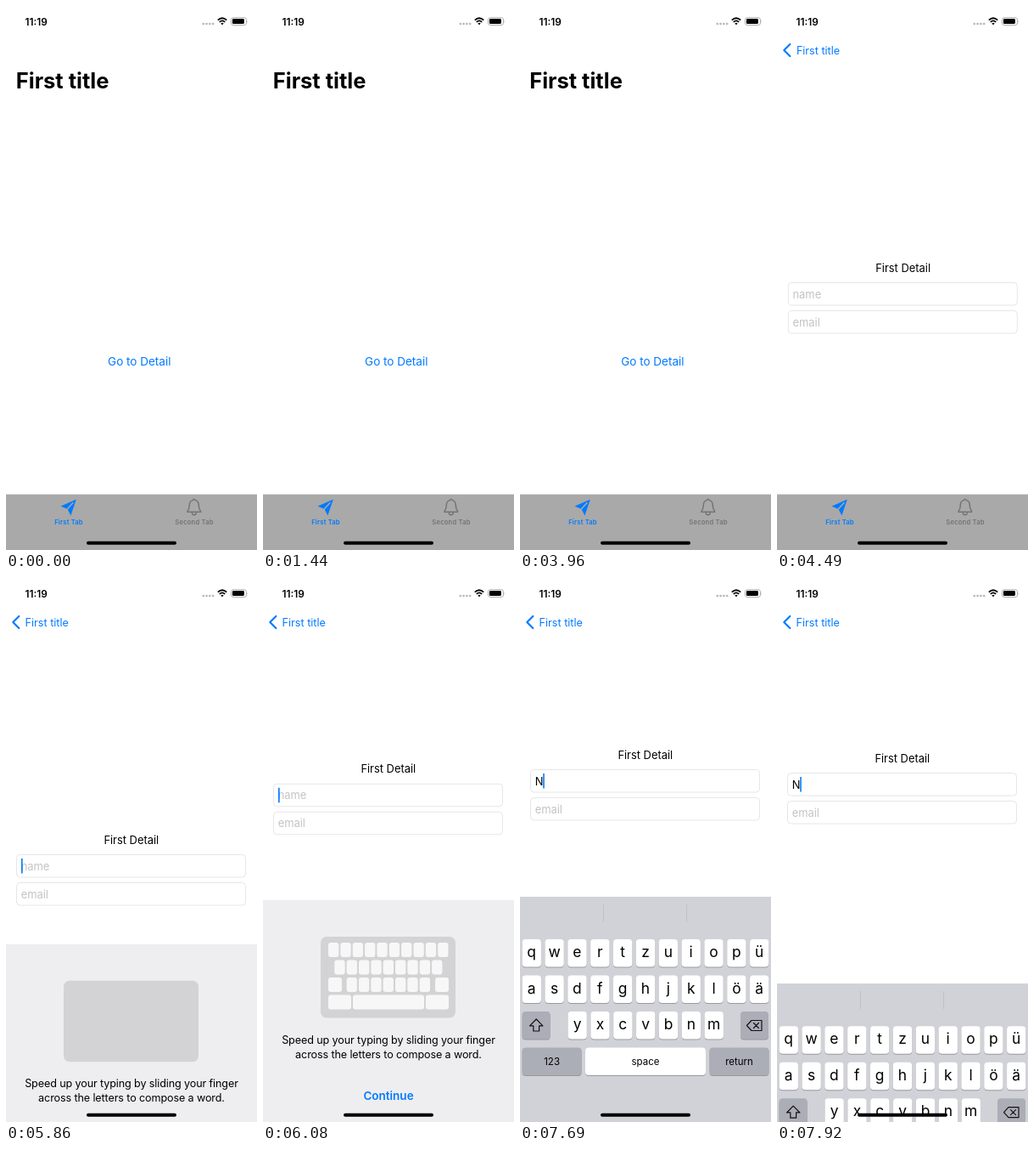
An HTML page for the animation above (7990 ms loop, 296 by 640 pixels).

```html
<!DOCTYPE html>
<html lang="en">
<head>
<meta charset="utf-8">
<title>Tabs, detail page and keyboard</title>
<style>
  html, body { margin: 0; width: 100%; height: 100%; overflow: hidden; background: #fff; }
  svg { display: block; width: 100%; height: 100%; font-family: Inter, Roboto, sans-serif; font-size: 12.9px; }
  .mid { text-anchor: middle; }
  .semi { font-weight: 600; }
  .blue { fill: #007aff; }
  .hint { fill: #c3c3c6; }
  .large { font-size: 25.5px; font-weight: 700; }
  .field { fill: #fff; stroke: #e6e6e6; }
  .tip { font-size: 12.6px; letter-spacing: -.12px; }
  .tab { font-size: 7.6px; font-weight: 600; letter-spacing: .2px; stroke: none; }
  .icon { stroke-width: 1.5; stroke-linejoin: round; stroke-linecap: round; }
  .key { font-size: 17.4px; text-anchor: middle; }
  .small { font-size: 11.5px; text-anchor: middle; }
  .line { fill: none; stroke: #111; stroke-width: 1.2; stroke-linejoin: round; stroke-linecap: round; }
</style>
</head>
<body>
<svg viewBox="0 0 296 640" xmlns="http://www.w3.org/2000/svg">
  <defs>
    <linearGradient id="sky" x2="1" y2=".4">
      <stop offset="0" stop-color="#aebfd6"/><stop offset=".3" stop-color="#dde5ee"/>
      <stop offset=".7" stop-color="#e4ebf3"/><stop offset="1" stop-color="#bdd2ec"/>
    </linearGradient>
    <linearGradient id="trees" x2="0" y2="1">
      <stop offset="0" stop-color="#85807f"/><stop offset=".5" stop-color="#9a8a80"/><stop offset="1" stop-color="#846c5e"/>
    </linearGradient>
    <linearGradient id="wool" x2="0" y2="1">
      <stop offset="0" stop-color="#dfd2c5"/><stop offset=".6" stop-color="#d3c1b1"/><stop offset="1" stop-color="#bfa590"/>
    </linearGradient>
    <linearGradient id="face" x2="0" y2="1">
      <stop offset="0" stop-color="#74655d"/><stop offset="1" stop-color="#5c4b43"/>
    </linearGradient>
    <filter id="blur" x="-20%" y="-20%" width="140%" height="140%"><feGaussianBlur stdDeviation="5"/></filter>
    <filter id="soft"><feGaussianBlur stdDeviation="1.7"/></filter>
    <clipPath id="frame"><rect y="293.500" width="296" height="197"/></clipPath>
  </defs>
  <rect width="296" height="640" fill="#fff"/>

  <g id="home">
    <text id="go" class="blue mid" x="157.300" y="422.700" font-size="13.5">Go to Detail</text>
  </g>
  <text id="title" class="large" x="11.800" y="97.400">First title</text>

  <g id="second">
    <text class="mid semi" x="147.700" y="56.600">Second</text>
    <g clip-path="url(#frame)">
      <rect y="293" width="296" height="198" fill="url(#sky)"/>
      <g filter="url(#blur)">
        <path d="M-15 306L22 302 40 328 62 346 100 350 110 510H-15Z" fill="url(#trees)"/>
        <path d="M185 376L215 374 238 356 248 376 268 364 280 392 312 402V510H185Z" fill="url(#trees)"/>
        <path d="M-10 312H32L38 345 20 370-10 360Z" fill="#716c6c"/>
        <path d="M232 362L242 355 250 390 264 365 278 398 255 415 232 400Z" fill="#7a706c"/>
        <ellipse cx="262" cy="480" rx="38" ry="18" fill="#6f584c"/>
      </g>
      <g filter="url(#soft)">
        <path d="M98 372Q90 412 82 440L75 496H201L200 440 190 370Z" fill="url(#wool)"/>
        <path d="M81 442L75 496H90Q84 465 90 425Z" fill="#a9836a"/>
        <path d="M112 440Q138 458 164 440L160 496H118Z" fill="#c0a995"/>
        <path d="M85 292Q90 318 101 330L122 321Q119 302 114 292ZM217 292Q210 322 196 338L176 325Q179 305 187 292Z" fill="#544741"/>
        <path d="M95 292Q99 312 107 321L116 315 109 292ZM208 292Q204 315 194 326L185 320Q187 306 195 292Z" fill="#93796c"/>
        <path d="M103 330Q119 314 146 312 176 314 192 333 199 350 192 374 187 405 169 424 148 438 122 430 104 414 98 380 92 350 103 330Z" fill="url(#face)"/>
        <path d="M121 328Q147 310 174 328L160 354Q141 342 126 357Z" fill="#85776f"/>
        <path d="M135 338Q146 329 156 339L154 352H133Z" fill="#a7a6aa"/>
        <ellipse cx="141" cy="386" rx="25" ry="30" fill="#97877c"/>
        <path d="M121 429Q138 425 153 430L145 443 131 441Z" fill="#43352f"/>
        <path d="M122 362Q129 353 142 353 156 353 161 363 154 374 144 374L141 380 138 374Q127 374 122 362Z" fill="#544742"/>
        <path d="M117 395Q129 405 141 398 152 405 165 396 163 414 142 417 122 415 117 395Z" fill="#6d5a50"/>
        <path d="M122 404Q132 409 142 405 152 409 161 404 154 414 142 414 130 414 122 404Z" fill="#b5a193"/>
        <circle cx="100" cy="352" r="6.500" fill="#1f1a1b"/><circle cx="188" cy="355" r="6.500" fill="#1f1a1b"/>
        <path d="M98 400L118 392M165 394L187 400" stroke="#e8ddd2" stroke-width="1.500"/>
      </g>
    </g>
  </g>

  <g id="detail">
    <rect y="92" width="296" height="620" fill="#fff"/>
    <text class="mid" x="147.800" y="312.600">First Detail</text>
    <rect class="field" x="12.500" y="325.500" width="270" height="26.500" rx="4"/>
    <rect class="field" x="12.500" y="358.500" width="270" height="26.500" rx="4"/>
    <text id="name" class="hint" x="17.700" y="343.600">name</text>
    <text class="hint" x="17.700" y="376.600">email</text>
    <rect id="caret" class="blue" y="330" width="1.600" height="17.500"/>
  </g>
  <g id="back">
    <path d="M15.300 45L8.300 52 15.300 59" fill="none" stroke="#007aff" stroke-width="2.200" stroke-linecap="round" stroke-linejoin="round"/>
    <text id="backText" class="blue" y="56.600" font-size="12.6">First title</text>
  </g>

  <text class="semi" x="22.600" y="22.700" font-size="11.8">11:19</text>
  <g fill="#b9b9b9">
    <rect x="231.500" y="19.700" width="2.500" height="2.500" rx=".8"/><rect x="235.300" y="19.700" width="2.500" height="2.500" rx=".8"/>
    <rect x="239.100" y="19.700" width="2.500" height="2.500" rx=".8"/><rect x="242.900" y="19.700" width="2.500" height="2.500" rx=".8"/>
  </g>
  <path d="M249.800 16.600Q255 11.800 260.200 16.600M251.800 18.800Q255 15.900 258.200 18.800" fill="none" stroke="#000" stroke-width="1.800"/>
  <path d="M253.300 20.500Q255 19.200 256.700 20.500L255 22.300Z"/>
  <rect x="265.500" y="13.700" width="18" height="8.800" rx="2.600" fill="none" stroke="#a5a5a5" stroke-width=".9"/>
  <rect x="266.900" y="15.100" width="14" height="6" rx="1.400"/>
  <path d="M284.600 16.700Q286 18.100 284.600 19.500Z" fill="#a5a5a5"/>

  <rect y="574.500" width="296" height="66" fill="#a9a9a9"/>
  <g id="tab0" class="icon">
    <path d="M82.800 580.500L64.500 588.600 72.400 591.800 76.400 599.600Z"/>
    <path id="fold" d="M72.400 591.800L79 584.600"/>
    <text class="tab mid" x="74" y="610">First Tab</text>
  </g>
  <g id="tab1" class="icon">
    <path d="M214 595.300H229.600Q230.200 594.300 228.300 592.200 227.400 590.500 227.300 587 227 582.600 223.500 581.600 221.800 579 220.100 581.600 216.600 582.600 216.300 587 216.200 590.500 215.300 592.200 213.400 594.300 214 595.300Z"/>
    <path d="M219.300 596.800Q219.800 598.800 221.800 598.800 223.800 598.800 224.300 596.800"/>
    <text class="tab mid" x="222" y="610">Second Tab</text>
  </g>

  <g id="panel">
    <g id="tour">
      <rect y="375" width="296" height="265" fill="#eeeef0"/>
      <rect x="68" y="418" width="159" height="95.500" rx="7" fill="#d3d3d5"/>
      <g id="tourKeys" fill="#fff"></g>
      <circle id="dot" class="blue" r="4.600"/>
      <text class="tip mid" x="148" y="543.500">Speed up your typing by sliding your finger</text>
      <text class="tip mid" x="148" y="560.500">across the letters to compose a word.</text>
      <text class="blue mid semi" x="148" y="609.500" font-size="13.5">Continue</text>
    </g>
    <g id="board">
      <rect y="375" width="296" height="265" fill="#d0d2d7"/>
      <path d="M98.500 384V405M196.500 384V405" stroke="#bfc1c6"/>
      <g id="keys"></g>
      <path class="line" d="M19.200 519L11.500 526.800H15.800V533H22.600V526.800H26.900Z"/>
      <path class="line" d="M267.500 526.500L273 520.500H285V532.500H273ZM275.500 523.500L281.500 529.500M281.500 523.500L275.500 529.500"/>
    </g>
  </g>
  <rect x="95" y="629.800" width="106" height="4" rx="2"/>
</svg>
<script>
const LOOP = 7990, BLUE = '#007aff', GRAY = '#747474';
const $ = id => document.getElementById(id);
const set = (id, attrs) => { for (const k in attrs) $(id).setAttribute(k, attrs[k]); };
const show = (id, on) => set(id, { opacity: +on });
const move = (id, x, y) => set(id, { transform: `translate(${x} ${y})` });

function add(parent, tag, attrs, text) {
  const el = document.createElementNS('http://www.w3.org/2000/svg', tag);
  for (const k in attrs) el.setAttribute(k, attrs[k]);
  if (text) el.textContent = text;
  return $(parent).appendChild(el);
}

// Small keyboard of the typing tip
const tourKey = (x, y, width) => add('tourKeys', 'rect', { x, y, width, height: 17, rx: 3 });
[[10, 77, 425], [9, 84.3, 445.5], [7, 98.6, 466]].forEach(([n, x, y]) => {
  for (let i = 0; i < n; i++) tourKey(x + i * 14.35, y, 12.3);
});
[[77, 466, 16], [203, 466, 16], [77, 486.5, 27], [106, 486.5, 84], [192, 486.5, 27]].forEach(k => tourKey(...k));

// Full keyboard
function key(x, y, width, fill = '#fff') {
  add('keys', 'rect', { x, y: y + 1, width, height: 32.5, rx: 4, fill: '#97999e' });
  add('keys', 'rect', { x, y, width, height: 32.5, rx: 4, fill });
}
const letters = [];
[['qwertzuiopü', 2.6, 425], ['asdfghjklöä', 2.6, 467.5], ['yxcvbnm', 56.5, 510]].forEach(([row, x0, y]) => {
  [...row].forEach((c, i) => {
    const x = x0 + i * 26.85;
    key(x, y, 22.3);
    letters.push([add('keys', 'text', { class: 'key', x: x + 11.1, y: y + 21 }, c), c]);
  });
});
const DARK = '#abaeb6';
key(2.6, 510, 33, DARK);
key(260, 510, 33, DARK);
[['123', 2.6, 70, DARK], ['space', 77, 142, '#fff'], ['return', 223.5, 70, DARK]].forEach(([s, x, w, fill]) => {
  key(x, 552.5, w, fill);
  add('keys', 'text', { class: 'small', x: x + w / 2, y: 573 }, s);
});

// Critically damped spring from 0 to 1
function spring(t, start) {
  const x = Math.max(0, t - start) * .015;
  return 1 - (1 + x) * Math.exp(-x);
}
// Holds time in n even steps between a and b
function held(t, a, b, n) {
  const d = (b - a) / (n - 1);
  return t >= b ? b : a + Math.floor((t - a) / d + 1e-6) * d;
}

const slide = [[148, 454], [127, 433.5], [112, 433.5], [91, 454], [141, 433.5]];
function alongSlide(p) {
  const u = p * (slide.length - 1), i = Math.min(slide.length - 2, Math.floor(u)), f = u - i;
  const e = f * f * (3 - 2 * f);
  return slide[i].map((v, k) => v + (slide[i + 1][k] - v) * e);
}

// Active icons are solid, idle ones are outlines
function paintTab(id, on) {
  $(id).querySelectorAll('path').forEach(p => {
    p.setAttribute('fill', on ? BLUE : 'none');
    p.setAttribute('stroke', on ? 'none' : GRAY);
  });
  $(id).querySelector('text').setAttribute('fill', on ? BLUE : GRAY);
}

function draw(t) {
  // Tabs
  const second = t >= 2720 && t < 3960;
  show('second', second);
  show('home', !second && t < 4980);
  paintTab('tab0', !second);
  paintTab('tab1', second);
  if (!second) set('fold', { stroke: '#a9a9a9' });

  // Push to the detail page
  const push = t < 3960 ? 0 : t >= 4980 ? 1 : spring(held(t, 3960, 4490, 8), 3950);
  move('home', -89 * push, 0);
  move('title', -60 * push, 0);
  set('title', { opacity: second ? 0 : Math.max(0, 1 - push * 1.3) });
  set('back', { opacity: push * push });
  set('backText', { x: 22.6 + 100 * (1 - push) });

  // Panel rises, later drops; the page follows late
  const rise = held(t, 5860, 6290, 7), drop = held(t, 7520, 7920, 6);
  let low = 265, lift = 0;
  if (t >= 5860) {
    low = t < 6450 ? 265 * (1 - spring(rise, 5665)) : 0;
    lift = t < 6450 ? 100 * spring(rise, 5860) : 100;
  }
  if (t >= 7520) {
    low = 265 * spring(drop, 7831);
    lift = 100 * (1 - spring(drop, 7899));
  }
  move('panel', 0, low);
  show('panel', t >= 5860);
  show('detail', t >= 3960);
  move('detail', 296 * (1 - push), -lift);

  // Typing tip
  set('tourKeys', { opacity: t < 5860 ? 0 : t < 6450 ? spring(rise, 5860) : 1 });
  const [cx, cy] = alongSlide(Math.min(1, Math.max(0, (held(t, 6680, 7450, 11) - 6680) / 770)));
  set('dot', { cx, cy });
  show('dot', t >= 6680 && t < 7520);

  // Keyboard and text entry
  const typed = t >= 7680;
  set('board', { opacity: t < 7520 ? 0 : t < 7600 ? .5 : 1 });
  letters.forEach(([el, c]) => { el.textContent = typed ? c : c.toUpperCase(); });
  $('name').textContent = typed ? 'N' : 'name';
  $('name').setAttribute('class', typed ? '' : 'hint');
  set('caret', { x: typed ? 27.2 : 18 });
  show('caret', (t >= 5860 && t < 6450) || t >= 6950);
}

function tick(now) {
  draw(now % LOOP);
  requestAnimationFrame(tick);
}
draw(0);
requestAnimationFrame(tick);
</script>
</body>
</html>
```
